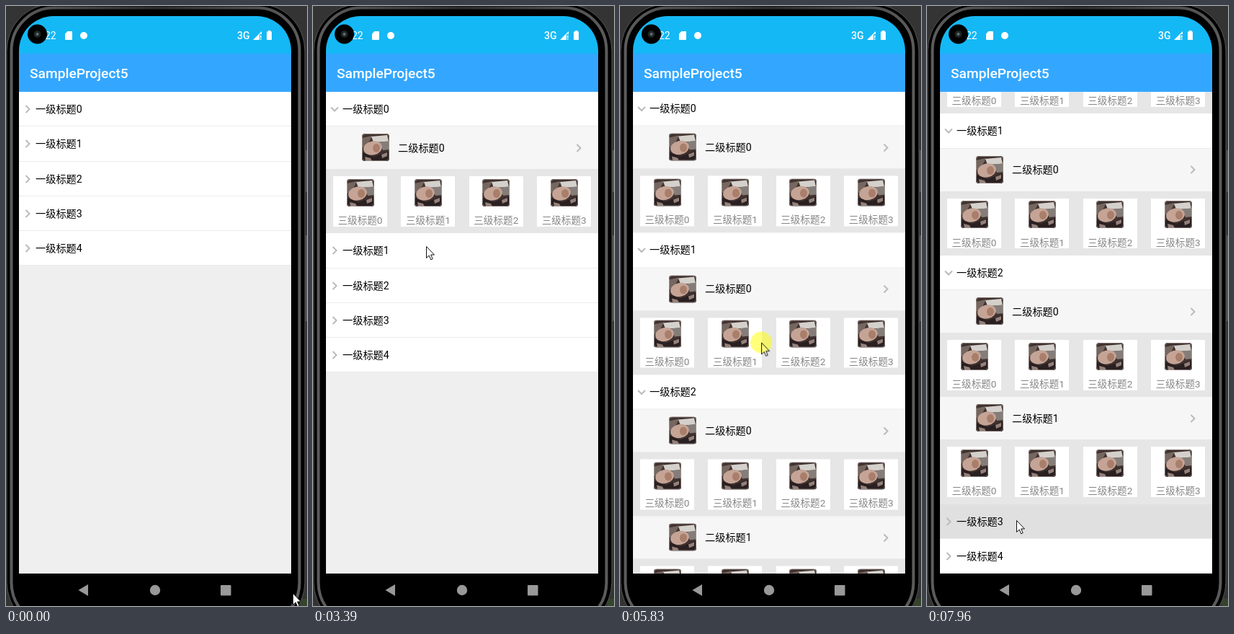
These frames come from a looping animation (418 by 832 pixels, 8000 ms). An HTML page:

```html
<!DOCTYPE html>
<html lang="zh-CN">
<head>
<meta charset="utf-8">
<title>Expandable list</title>
<style>
html, body { margin: 0; width: 100%; height: 100%; overflow: hidden; background: #333; }
body { position: relative; font: 14.2px/20px Roboto, "Noto Sans CJK SC", "Noto Sans CJK", sans-serif; color: #000; }
.layer { position: absolute; left: 0; top: 0; display: block; }
.view { position: absolute; left: 18px; top: 119px; width: 378px; height: 668px; overflow: hidden; background: #efefef; }
.stretch { height: 100%; transform-origin: 50% 100%; animation: stretch 8s linear infinite; }
.list { animation: scroll 8s linear infinite; }

.group { --show: none; --turn: 0deg; --bg: #fff; animation: 8s step-end infinite; }
.group:nth-child(1) { animation-name: open0; }
.group:nth-child(2) { animation-name: open1; }
.group:nth-child(3) { animation-name: open2; }
.group:nth-child(4) { animation-name: press3; }
.head { position: relative; box-sizing: border-box; height: 48.25px; border-bottom: 1px solid #ebebeb; background: var(--bg); }
.head span { position: absolute; left: 23px; top: 14px; }
.head svg { position: absolute; left: 5.5px; top: 18px; transform: rotate(var(--turn)); }
.kids { display: var(--show); }
.sub { position: relative; height: 59px; background: #f6f6f6; }
.sub .pic { position: absolute; left: 50px; top: 10px; }
.sub span { position: absolute; left: 100px; top: 19.5px; }
.sub .arrow { position: absolute; left: 345px; top: 23.5px; }
.grid { position: relative; height: 89.2px; background: #e6e6e6; }
.cell { position: absolute; top: 10px; width: 75px; height: 69.5px; background: #fff; color: #868686; font-size: 13.6px; text-align: center; }
.cell .pic { position: absolute; left: 18.5px; top: 3.5px; }
.cell span { position: absolute; left: 0; width: 100%; top: 51px; }

#cursor { animation: move 8s linear infinite; }
#press { animation: press 8s step-end infinite; }

@keyframes open0 {
  0% { --show: none; --turn: 0deg; }
  23.45%, 100% { --show: block; --turn: 90deg; }
}
@keyframes open1 {
  0% { --show: none; --turn: 0deg; --bg: #fff; }
  43.2% { --show: none; --turn: 0deg; --bg: #e0e0e0; }
  45.1%, 100% { --show: block; --turn: 90deg; --bg: #fff; }
}
@keyframes open2 {
  0% { --show: none; --turn: 0deg; --bg: #fff; }
  60.3% { --show: none; --turn: 0deg; --bg: #e0e0e0; }
  62.2%, 100% { --show: block; --turn: 90deg; --bg: #fff; }
}
@keyframes press3 {
  0% { --bg: #fff; }
  98.7%, 100% { --bg: #e0e0e0; }
}
@keyframes scroll {
  0%, 72.875% { transform: translateY(0); }
  76.85%, 100% { transform: translateY(-166px); }
}
@keyframes stretch {
  0%, 76.85% { transform: scaleY(1); }
  78.25% { transform: scaleY(1.0101); }
  79.25% { transform: scaleY(1.012); animation-timing-function: ease-out; }
  83.5%, 100% { transform: scaleY(1); }
}
@keyframes press {
  0%, 18.85%, 42.3%, 60.3%, 79.2%, 98.7%, 100% { opacity: 0; }
  17.2%, 40.6%, 59.55%, 72%, 97.8% { opacity: 1; }
}
@keyframes move {
  0%, .8% { transform: translate(398px, 814px); animation-timing-function: ease-in-out; }
  10.75%, 11.2% { transform: translate(185px, 170px); }
  14.6%, 18.4% { transform: translate(132px, 137px); }
  19.8%, 23.4% { transform: translate(192px, 139px); }
  27.8%, 29.1% { transform: translate(196px, 171px); animation-timing-function: ease-in-out; }
  33.3%, 34.8% { transform: translate(143px, 348px); }
  36.1%, 38.1% { transform: translate(143px, 331px); }
  42.3%, 45.1% { transform: translate(157px, 333px); }
  48.75% { transform: translate(175px, 355px); animation-timing-function: ease-in-out; }
  57.7%, 62.8% { transform: translate(164px, 532px); }
  68.3%, 69.7% { transform: translate(172px, 520px); }
  72.875% { transform: translate(196px, 467px); }
  78.25% { transform: translate(229px, 231px); }
  79.25%, 80.6% { transform: translate(232px, 214px); animation-timing-function: ease-in-out; }
  90.3% { transform: translate(150px, 643px); animation-timing-function: ease-out; }
  97.5%, 100% { transform: translate(124px, 713px); }
}
</style>
</head>
<body>
<svg class="layer" width="418" height="832">
  <defs>
    <linearGradient id="rim" x2="1" y2="0">
      <stop offset="0" stop-color="#5c5c5c"/><stop offset=".5" stop-color="#2c2c2c"/><stop offset="1" stop-color="#5c5c5c"/>
    </linearGradient>
    <clipPath id="round"><rect width="38" height="38" rx="4"/></clipPath>
    <symbol id="photo" viewBox="0 0 38 38">
      <g clip-path="url(#round)">
        <path fill="#40322f" d="M0 0h38v38H0z"/>
        <path fill="#756660" d="M0 6 14 3 8 15 0 20z"/>
        <path fill="#d4d0cc" d="M13 4 35 2 37 11 16 12z"/>
        <path fill="#857d79" d="M24 12 38 10v12l-9 1z"/>
        <ellipse cx="15" cy="20" rx="13" ry="9.5" fill="#c5a496" transform="rotate(-12 15 20)"/>
        <ellipse cx="20" cy="20" rx="5" ry="6" fill="#a97e6a"/>
        <path fill="#2a2021" d="M0 26 16 32 38 24v14H0z"/>
        <path fill="#94807a" d="m4 32 8 2 2 4H5zM27 29l8-3v5l-7 3z"/>
        <rect x=".5" y=".5" width="37" height="37" rx="4" fill="none" stroke="#aaa09c" stroke-opacity=".6"/>
      </g>
    </symbol>
  </defs>
  <path fill="#343434" d="M0 0h418v832H0z"/>
  <path fill="#555" d="M416 200h2v58h-2zM416 318h2v119h-2z"/>
  <path fill="#34452c" d="M409 822h9v10h-9z"/>
  <rect x="1" y="-3" width="414" height="867" rx="65" stroke="#555"/>
  <rect x="7.5" y="2.5" width="400" height="856" rx="59" stroke="url(#rim)" stroke-width="4"/>
  <path fill="#14b8f5" d="M18 67v-5a48 48 0 0 1 48-48h282a48 48 0 0 1 48 48v5z"/>
  <path fill="#33a7ff" d="M18 66h378v53H18z"/>
  <g fill="#fff">
    <text x="54" y="46" font-size="14">22</text>
    <path d="M85.500 35H91q1 0 1 1v10q0 1-1 1h-8q-1 0-1-1v-7.500z"/>
    <circle cx="108" cy="41" r="5"/>
    <text x="321" y="45.500" font-size="14" font-weight="500">3G</text>
    <path d="M343 47 355 35v4h-3v8z"/>
    <path d="M353 40.500h1.500v4H353zM353 45.500h1.500V47H353z"/>
    <path d="M364 34h3.500v1.500h1.500V47h-7V35.500h2z"/>
    <text x="33" y="99.500" font-size="19.200" font-weight="500">SampleProject5</text>
  </g>
  <circle cx="43.500" cy="39" r="13.500"/>
  <circle cx="43.500" cy="39" r="5" fill="#1d2626"/>
  <circle cx="43.500" cy="39" r="2" fill="#66706e"/>
  <g fill="#999">
    <path d="M100.500 810 114 802v16z"/>
    <circle cx="207" cy="810" r="7.200"/>
    <rect x="298" y="803" width="14.500" height="14.500" rx="1"/>
  </g>
</svg>

<div class="view"><div class="stretch"><div class="list" id="list"></div></div></div>

<svg class="layer" width="418" height="832">
  <g id="cursor">
    <path fill="#fff" d="M.5 .5V16.500L4.200 13 6.700 18.800 9.200 17.700 6.700 12H11.500z"/>
    <circle id="press" r="15" fill="#ff0" fill-opacity=".52"/>
    <path fill="none" stroke="#111" d="M.5 .5V16.500L4.200 13 6.700 18.800 9.200 17.700 6.700 12H11.500z"/>
  </g>
</svg>

<script>
const range = (n, fn) => Array.from({ length: n }, (_, i) => fn(i)).join('');
const pic = '<svg class="pic" width="38" height="38"><use href="#photo"/></svg>';
const arrow = '<svg class="arrow" width="12" height="12"><path d="M3.500 1 8.500 6 3.500 11" fill="none" stroke="#bbb" stroke-width="2"/></svg>';

const cell = i => `<div class="cell" style="left:${10 + i * 94.4}px">${pic}<span>三级标题${i}</span></div>`;
const child = i => `<div class="sub">${pic}<span>二级标题${i}</span>${arrow}</div><div class="grid">${range(4, cell)}</div>`;
const group = i => `<div class="group"><div class="head">${arrow}<span>一级标题${i}</span></div>
  <div class="kids">${range([1, 1, 2, 0, 0][i], child)}</div></div>`;

document.getElementById('list').innerHTML = range(5, group);
</script>
</body>
</html>
```
